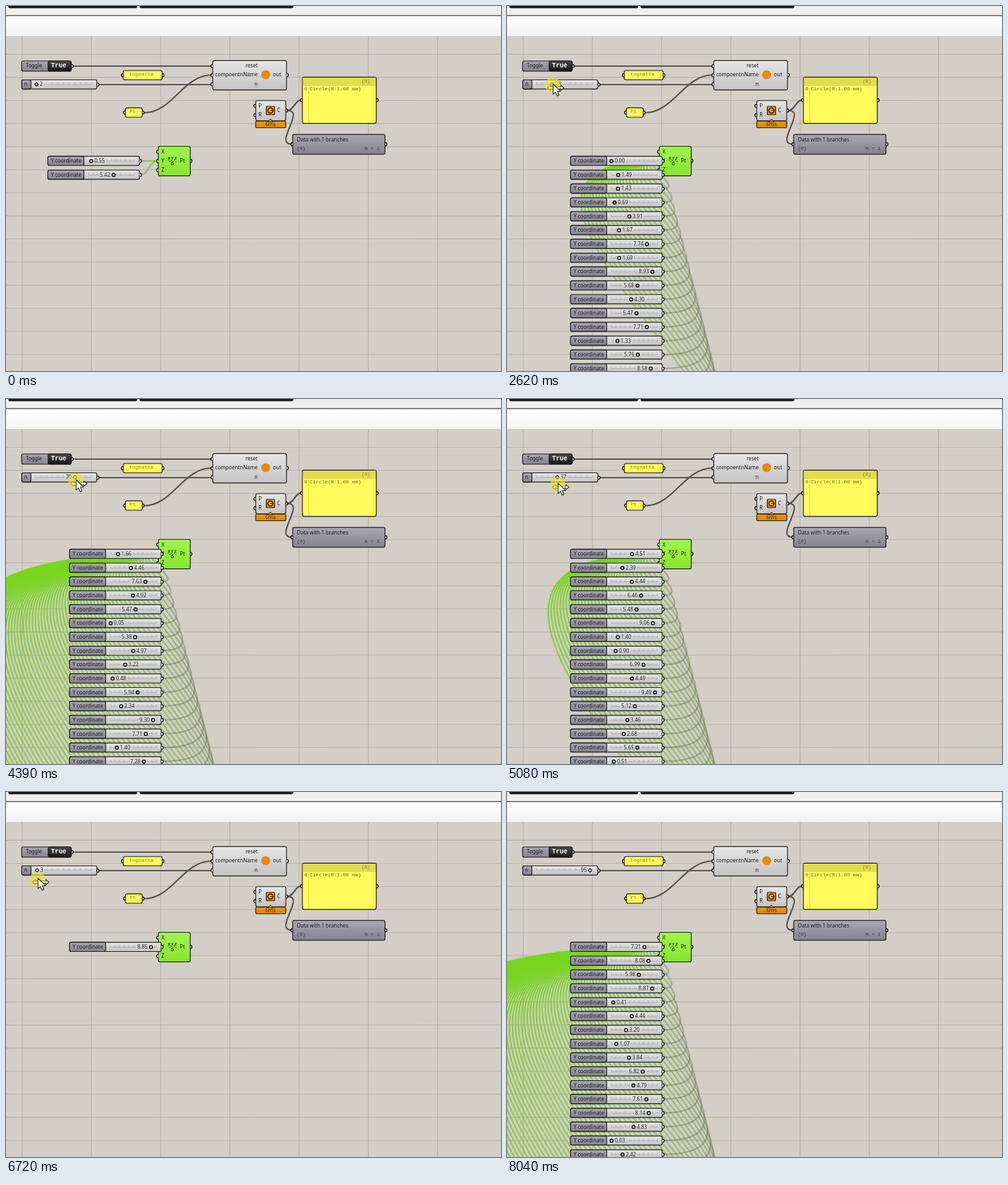
An HTML page with a canvas for the animation above (8730 ms loop, 775 px wide and 571 px high).

```html
<!DOCTYPE html>
<html lang="en">
<head>
<meta charset="utf-8">
<title>Node graph</title>
<style>
html, body { margin: 0; width: 100%; height: 100%; overflow: hidden; background: #d3cec6; }
canvas { display: block; }
</style>
</head>
<body>
<canvas id="stage" width="775" height="571"></canvas>
<script>
const W = 775, H = 571, LOOP = 8730, FRAME = 78, LAG = 30;
const g = document.getElementById('stage').getContext('2d');
const SANS = '8.1px "Noto Sans", "Open Sans", sans-serif';
const MONO = '7.9px "Liberation Mono", monospace';
const GREY = ['#a9a7b3', '#85838f'], SILVER = ['#e6e6e6', '#c3c3c3'], YELLOW = ['#fffb5c', '#fffb5c'];
const OLIVE = '#8b8434';
const ROW = 21.64, TOP = 242.3, MAX = 95;
const PRESS = 1620, RELEASE = 7730;

// Pointer moves; without x the pointer drags the grip of the count slider
const MOVES = [
  { from: 70, to: 900, n: [2, 2], x: [655, 52], y: [552, 124], ease: f => f * (2 - f) },
  { from: 1220, to: 1440, n: [2, 2], x: [52, 48], y: [124, 124] },
  { from: 1910, to: 2780, n: [5, 33], y: [124, 124] },
  { from: 2860, to: 3620, n: [40, 102], y: [124, 124] },
  { from: 3930, to: 4780, n: [95, 50], y: [124, 132] },
  { from: 4850, to: 5700, n: [49, 4.4], y: [133, 136] },
  { from: 6170, to: 6490, n: [4, 1], y: [136, 137] },
  { from: 6720, to: 7490, n: [3, 95], y: [137, 137] },
  { from: RELEASE, to: 8040, n: [95, 95], x: [150, 818], y: [152, 680] }
];
const moveAt = t => MOVES.findLast(m => m.from <= t);
const lerp = ([a, b], f) => a + (b - a) * f;

// Moves are seen in equal steps, each held until the next
function snap(t) {
  const m = moveAt(t);
  if (!m || t >= m.to + FRAME) return t;
  const steps = Math.round((m.to - m.from) / FRAME), size = (m.to - m.from) / steps;
  return m.from + size * Math.min(steps, Math.floor((t - m.from) / size + .1));
}

function progress(m, t) {
  const f = Math.min(1, (t - m.from) / (m.to - m.from));
  return m.ease ? m.ease(f) : f;
}

function countAt(t) {
  const m = moveAt(t);
  return m ? Math.min(MAX, Math.round(lerp(m.n, progress(m, t)))) : 2;
}

const gripX = n => 46 + n * .885;

function reading(count, i) {
  const r = Math.sin(count * 12.9898 + i * 78.233) * 43758.5453;
  return ((r - Math.floor(r)) * 9.6).toFixed(2);
}

function text(s, x, y, align = 'left', color = '#1c1c1c', font = SANS) {
  g.font = font;
  g.textAlign = align;
  g.fillStyle = color;
  g.fillText(s, x, y + 2.9);
}

function fade(y0, y1, colors) {
  const f = g.createLinearGradient(0, y0, 0, y1);
  colors.forEach((c, i) => f.addColorStop(i, c));
  return f;
}

function paint(fill, stroke, width) {
  g.fillStyle = fill;
  g.fill();
  g.strokeStyle = stroke;
  g.lineWidth = width;
  g.stroke();
}

function box(x, y, w, h, colors, r = 2.5) {
  g.beginPath();
  g.roundRect(x, y, w, h, r);
  paint(fade(y, y + h, colors), '#161616', 1.2);
}

function line(x0, y0, x1, y1, color, width = 1) {
  g.beginPath();
  g.moveTo(x0, y0);
  g.lineTo(x1, y1);
  g.strokeStyle = color;
  g.lineWidth = width;
  g.stroke();
}

function ring(x, y, r, width = 1.3, fill = '#fff') {
  g.beginPath();
  g.arc(x, y, r, 0, 7);
  paint(fill, '#111', width);
}

function disc(x, y, r, color) {
  g.beginPath();
  g.arc(x, y, r, 0, 7);
  g.fillStyle = color;
  g.fill();
}

function polygon(points, x, y, fill, stroke, width = 1.1) {
  g.beginPath();
  points.forEach(([px, py]) => g.lineTo(x + px, y + py));
  g.closePath();
  g.lineJoin = 'round';
  paint(fill, stroke, width);
}

// Half-round plug; dir is -1 for inputs and 1 for outputs
function port(x, y, dir) {
  g.beginPath();
  g.arc(x - dir, y, 2.6, -Math.PI / 2, Math.PI / 2, dir < 0);
  paint('#fff', '#111', 1.4);
}

function wire(x0, y0, x1, y1, reach, style = '#505050', width = 2.2) {
  g.beginPath();
  g.moveTo(x0, y0);
  g.bezierCurveTo(x0 + reach, y0, x1 - reach, y1, x1, y1);
  g.strokeStyle = style;
  g.lineWidth = width;
  g.stroke();
}

function background() {
  const grid = 'rgba(120,118,105,.36)';
  g.fillStyle = '#d3cec6';
  g.fillRect(0, 0, W, H);
  for (let x = 25.3; x < W; x += 108.4) line(x, 47, x, H, grid);
  for (let y = 75.5; y < H; y += 36.12) line(0, y, W, y, grid);
  g.fillStyle = '#f0eff0';
  g.fillRect(0, 0, W, 15);
  g.fillStyle = fade(16, 47, ['#ffffff', '#f2f2f2']);
  g.fillRect(0, 15, W, 32);
  g.fillStyle = '#4c4a4c';
  g.fillRect(0, 14.3, W, 1.4);
  g.fillStyle = '#1a1619';
  g.beginPath();
  g.roundRect(3.5, -6, 202, 9.5, 3);
  g.roundRect(209, -6, 241, 9.5, 3);
  g.fill();
}

function rail(x0, x1, y, gapA, gapB) {
  const color = '#a3a3a3';
  if (gapA > x0) line(x0, y + .5, gapA, y + .5, color, .8);
  if (gapB < x1) line(gapB, y + .5, x1, y + .5, color, .8);
  for (let i = 0; i <= 10; i++) {
    const x = x0 + (x1 - x0) * i / 10;
    if (x < gapA || x > gapB) line(x, y - 2.5, x, y + .5, color, .8);
  }
}

// The label sits on the roomier side of the grip
function label(s, x, y, x0, x1) {
  const right = x < (x0 + x1) / 2;
  g.font = SANS;
  const w = g.measureText(s).width + 6;
  rail(x0, x1, y, right ? x - 4 : x - w - 1, right ? x + w + 1 : x + 4);
  text(s, right ? x + 5 : x - 5.3, y, right ? 'left' : 'right', '#262626');
}

function slider(x, y, value) {
  box(x, y - 7.2, 143.5, 14.4, SILVER);
  box(x, y - 7.2, 56.5, 14.4, GREY);
  text('Y coordinate', x + 4.8, y);
  const hx = x + 64 + value * 7.18;
  label(value, hx, y, x + 64, x + 136);
  ring(hx, y + .3, 2.4, 1.6);
  port(x + 145, y + .3, 1);
}

function countSlider(n) {
  const x = gripX(n), y = 122.2, r = 2.8;
  box(24.7, 115.5, 117.5, 14.3, SILVER);
  box(24.7, 115.5, 14.3, 14.3, GREY);
  text('n', 28.5, y);
  label(String(n), x, y, 46, 134);
  polygon([[0, -r], [r, 0], [0, r], [-r, 0]], x, y + .3, '#fff', '#111', 1.2);
  port(144, 123, 1);
}

function fixedWires() {
  wire(104, 94, 322, 94, 60);
  wire(144, 123, 322, 123, 60);
  wire(216, 167, 322, 108, 45);
  wire(441, 163.5, 462, 147, 9);
  wire(441, 163.5, 447, 216, 28);
}

function fan(x, count) {
  const x0 = x + 145, x1 = 237, apart = x0 < x1;
  for (let i = count - 1; i >= (apart ? 0 : 1); i--) {
    const y = TOP + i * ROW;
    const tint = g.createLinearGradient(x0, y, x1, TOP);
    tint.addColorStop(0, 'rgba(100,104,90,.42)');
    tint.addColorStop(.5, 'rgba(126,186,66,.68)');
    tint.addColorStop(1, 'rgba(118,214,28,.95)');
    wire(x0, y, x1, TOP, apart ? 13 : Math.hypot(x0 - x1, y - TOP) * .75, tint, 2.4);
  }
}

function pointComponent() {
  const ink = '#1f3a0c';
  port(289.5, TOP, 1);
  box(238.5, 219.5, 50, 46.2, ['#a0f550', '#88e42f']);
  [...'XYZ'].forEach((s, i) => {
    port(237.5, 228 + i * 14.4, -1);
    text(s, 243.3, 227.7 + i * 14.4);
    text(s, 255.2 + i * 5.2, 236.6, 'center', ink, 'bold 6px "Noto Sans", sans-serif');
  });
  text('Pt', 272.3, 242);
  g.fillStyle = ink;
  for (let i = 0; i < 6; i++) g.fillRect(253.5 + i * 2.4, 240.5 + i % 2 * 2, 1.3, 1.3);
  ring(260.3, 246.8, 1.8, 1, '#b5f577');
}

function toggle() {
  port(103.5, 94, 1);
  box(24.5, 86, 77.5, 16, GREY);
  box(66, 86, 36, 16, ['#4a4a4a', '#161616']);
  text('Toggle', 31, 93.2);
  text('True', 70.5, 93, 'left', '#fff', 'bold 10px "Liberation Mono", monospace');
}

function script() {
  box(323.7, 85.3, 115.5, 46, SILVER);
  ['reset', 'compoentnName', 'n'].forEach((s, i) => {
    port(322.5, 94 + i * 14.3, -1);
    text(s, 394, 93 + i * 14.5, 'right');
  });
  port(440.5, 108, 1);
  text('out', 418, 107.5);
  disc(406.5, 107.5, 7, '#e58a12');
}

function note(s, x, y, w, h) {
  port(x - 1.2, y + h / 2, -1);
  port(x + w + 1.2, y + h / 2, 1);
  box(x, y, w, h, YELLOW);
  text(s, x + w / 2 - 2, y + 5.2, 'center', OLIVE, MONO);
}

function circleComponent() {
  port(389.8, 156.3, -1);
  port(389.8, 170.8, -1);
  port(439.5, 163.5, 1);
  box(391, 148, 47, 31.5, SILVER);
  text('P', 395.3, 155.8);
  text('R', 395.3, 170.2);
  text('C', 424.3, 163);
  box(407.5, 157, 13, 13, ['#f0a020', '#e08a00'], 1);
  ring(414, 163.5, 4, 1.4, '#f2a526');
  line(414, 163.5, 417.5, 163.5, '#111');
  box(391, 180, 47, 10.5, ['#ec9a1a', '#d98300'], 1.5);
  polygon([[-4.5, 4], [0, 0], [4.5, 4]], 414, 177, '#e89412', '#161616', 1);
  text('6ms', 414, 185, 'center', '#4a2c00');
}

function panels() {
  const ink = '#6f6a2a', dark = '#3a3940';
  port(462.7, 147.3, -1);
  port(581, 147.3, 1);
  box(464, 111.3, 115.7, 72.3, YELLOW);
  g.fillStyle = '#e1dc4f';
  g.fillRect(464.7, 112, 114.3, 13);
  line(474, 126, 474, 183, '#cfc94c', .9);
  text('{0}', 570.5, 116.8, 'right', OLIVE, MONO);
  text('0', 467, 129, 'left', ink, MONO);
  text('Circle(R:1.00 mm)', 475.5, 129, 'left', ink, MONO);

  port(447.7, 216.3, -1);
  port(594.7, 216.3, 1);
  box(448.8, 200.8, 144.6, 31, GREY);
  text('Data with 1 branches', 455.5, 209.5);
  text('{0}', 455, 222.3, 'left', dark, MONO);
  text('N = 1', 585, 222.3, 'right', dark, MONO);
}

const ARROW = [[0, 0], [0, 16], [3.6, 12.8], [6.4, 18.8], [9.2, 17.5], [6.5, 11.6], [11.6, 11.4]];
const HALF = [[-8, -1.6], [-8, -4], [-13, 0], [-8, 4], [-8, 1.6]];
const SWEEP = [...HALF, ...HALF.map(([x, y]) => [-x, -y])];

function pointer(t) {
  const m = moveAt(t);
  if (!m) return;
  const f = progress(m, t);
  const x = m.x ? lerp(m.x, f) : gripX(Math.min(MAX, lerp(m.n, f))) + 1;
  const y = lerp(m.y, f);
  if (x < 145 && y < 140) polygon(SWEEP, x + 4.5, y + 4, '#fff', '#222');
  if (t >= PRESS && t < RELEASE) disc(x, y, 12, 'rgba(240,226,44,.64)');
  polygon(ARROW, x + .5, y - 2, '#fff', '#222');
}

function draw(t) {
  // The sliders are rebuilt a little after the count changes
  const late = t - LAG, count = countAt(late);
  const x = late < 1910 ? 65.5 : 99.5;
  background();
  fixedWires();
  fan(x, count);
  toggle();
  script();
  note('tognatta', 183.5, 101, 61, 14.5);
  note('Pt', 187, 159.3, 26.3, 14.7);
  circleComponent();
  panels();
  pointComponent();
  for (let i = 0; i < count && TOP + i * ROW < H + 8; i++) slider(x, TOP + i * ROW, reading(count, i));
  countSlider(countAt(t));
  pointer(t);
}

const start = performance.now();
function tick() {
  draw(snap((performance.now() - start) % LOOP));
  requestAnimationFrame(tick);
}
tick();
</script>
</body>
</html>
```
